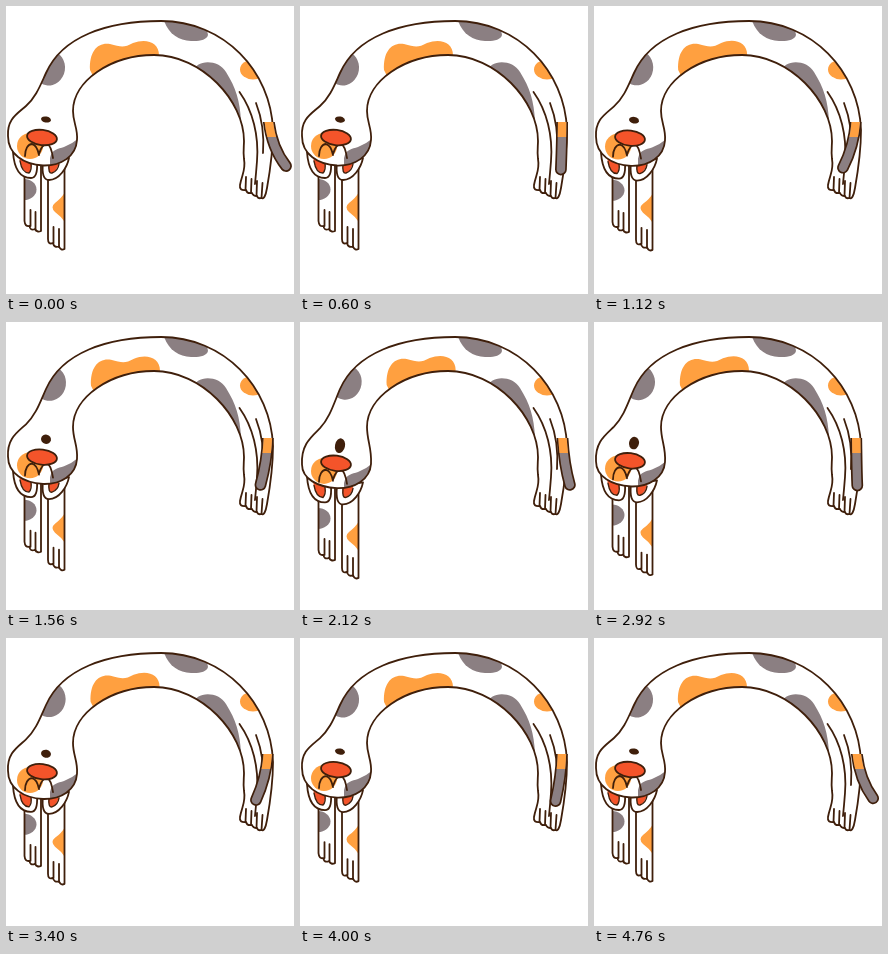
An HTML page with a canvas that plays this animation: 288x288 px, repeating every 4800 ms.

```html
<!DOCTYPE html>
<html lang="en">
<head>
<meta charset="utf-8">
<style>
html, body { margin: 0; width: 100%; height: 100%; overflow: hidden; background: #fff; }
canvas { display: block; width: 288px; height: 288px; }
</style>
</head>
<body>
<canvas id="stage" width="288" height="288"></canvas>
<script>
const ctx = document.getElementById('stage').getContext('2d');
const INK = '#3f1f0b', GRAY = '#8b7f82', ORANGE = '#ffa040', RED = '#f4542a';
const LOOP = 4800, STEP = 40;
// Sideways swing of the tail tip: [ms, x], repeated every half loop
const SWING = [[0, 280], [560, 262], [1000, 250], [1240, 248], [1560, 254.5],
               [2100, 269], [2240, 275], [2400, 280.5]];

const shape = d => new Path2D(d);

function oval(x, y, rx, ry, tilt = 0) {
  const p = new Path2D();
  p.ellipse(x, y, rx, ry, tilt, 0, Math.PI * 2);
  return p;
}

function fill(path, color) {
  ctx.fillStyle = color;
  ctx.fill(path);
}

function line(path, width = 1.8, color = INK) {
  ctx.lineWidth = width;
  ctx.strokeStyle = color;
  ctx.stroke(path);
}

function shifted(dx, dy, draw) {
  ctx.save();
  ctx.translate(dx, dy);
  draw();
  ctx.restore();
}

function clipped(path, draw) {
  ctx.save();
  ctx.clip(path);
  draw();
  ctx.restore();
}

// White outlined form with markings kept inside it
function form(path, markings) {
  fill(path, '#fff');
  clipped(path, markings);
  line(path);
}

function tipAt(ms) {
  const i = SWING.findIndex(k => k[0] > ms);
  const [t0, x0] = SWING[i - 1], [t1, x1] = SWING[i];
  return x0 + (x1 - x0) * (ms - t0) / (t1 - t0);
}

function frontLegs() {
  form(shape('M18.5 150V215Q19 221 23.5 220Q24 225 29 223Q31 227 35 225V150Z'),
    () => fill(oval(18, 183.5, 12.5, 10.5), GRAY));
  line(shape('M24.5 204V220M29.5 206V223'));
  form(shape('M42 150V233Q42 239 47 237Q48 242 53 240.5Q55 245 58.5 243V150Z'),
    () => fill(shape('M60 184Q57 191 49 197Q44 201 49 206Q56 211 60 218Z'), ORANGE));
  line(shape('M47.5 221V237M53 223V241'));
}

function ears() {
  form(shape('M7 146C8 161 13 172 25 172Q32 172 31 156Z'),
    () => fill(shape('M13 150Q15 166 23 167Q26 163 25 150Z'), RED));
  line(shape('M14 155Q16 167 23 167Q26 164 25 157'), 1.4);
  form(shape('M37 156Q35 174 43 174C53 174 61 162 63 152Z'),
    () => fill(shape('M43 150Q41 168 46 167Q53 164 54 150Z'), RED));
  line(shape('M43 158Q42 168 46 167Q52 165 53 158'), 1.4);
}

function bodyPath(e) {
  const left = 130 + 14 * e, right = 134 + 9 * e, low = 159.5 + 7.5 * e;
  return shape(`M2 ${left}
    C1 ${113 + 11 * e} 11 ${108 + 8 * e} 20 ${100 + 7 * e}
    C30 ${91 + 5 * e} 34 ${80 + e} 40 67
    C56 31 100 15 155 15 C218 15 265 65 267 124
    C267 148 264 165 261 182 Q259 194 255.5 192
    Q252 193 251 190 Q247 190 246 187 Q241 188 240 184
    Q233 185 234 179 C236 168 240 164 238 153
    C237 145 238 140 238 135 C238 95 196 49 148 49
    C105 49 67 75 67 105
    C67 ${117 + 2 * e} 72 ${122 + 5 * e} 71 ${right}
    C70 ${low - 9} 55 ${low + .5} 37 ${low}
    C18 ${low - 1} 2 ${low - 11 + 2 * e} 2 ${left}Z`);
}

function markings(e) {
  shifted(3 * e, -2 * e, () => fill(oval(43, 62, 16, 17.5, .15), GRAY));
  shifted(3 * e, -e, () => fill(shape(
    'M84 64C83 45 92 36 104 38C115 41 118 42 127 37C140 32 153 36 153 49L150 60L88 72Z'), ORANGE));
  fill(shape('M157 12C162 28 172 34 185 35C193 35.5 201 34 202 29Q201 22 198 12Z'), GRAY);
  fill(shape('M188 66C188 54 212 52 220 66C230 82 234 95 235 115L210 102Z'), GRAY);
  fill(oval(247, 63.5, 13, 10), ORANGE);
  shifted(0, 10 * e, () => {
    fill(oval(24, 140, 13, 13), ORANGE);
    fill(shape('M44 166V152C46 143 52 143 58 141Q66 138 73 132V168Z'), GRAY);
  });
}

function face(e) {
  fill(oval(40, 113.5 + 11.5 * e, 5, 3 + 5 * e, .2), INK);
  shifted(0, 11 * e, () => {
    line(shape('M19 150C19 143 22 138 26 138Q31 139 33 149M33 148Q36 138 41 138Q45 139 47 152'));
    const mouth = oval(36, 131.5, 15, 7.6, .12);
    fill(mouth, RED);
    line(mouth);
  });
}

function hindLegLines() {
  line(shape('M233.5 86C247 105 253 130 251 155Q250 168 249 178'));
  line(shape('M250 97Q259 120 257 147'));
  line(shape('M240 171L239.5 184M245.5 173L245 187M251 175L250.5 190M256.5 177L255.5 192'));
}

function band(top, bottom) {
  const p = new Path2D();
  p.rect(0, top, 288, bottom - top);
  return p;
}

function tail(x) {
  const y = 163.5 - 3.5 * ((x - 262) / 18) ** 2;
  const spine = shape(`M262 104C262.5 125 ${262 + (x - 262) * .35} 145 ${x} ${y}`);
  clipped(band(116, 288), () => {
    line(spine, 11.8);
    line(spine, 8.4, GRAY);
  });
  clipped(band(116, 131), () => line(spine, 8.4, ORANGE));
}

function draw(ms) {
  const e = Math.sin(Math.PI * ms / LOOP) ** 7;
  ctx.fillStyle = '#fff';
  ctx.fillRect(0, 0, 288, 288);
  ctx.lineCap = ctx.lineJoin = 'round';
  shifted(0, 14.5 * e, frontLegs);
  shifted(0, 9.5 * e, ears);
  form(bodyPath(e), () => markings(e));
  face(e);
  hindLegLines();
  tail(tipAt(ms % (LOOP / 2)));
}

const start = performance.now();
function tick() {
  const ms = (performance.now() - start) % LOOP;
  draw(Math.floor(ms / STEP) * STEP);
  requestAnimationFrame(tick);
}
tick();
</script>
</body>
</html>
```
